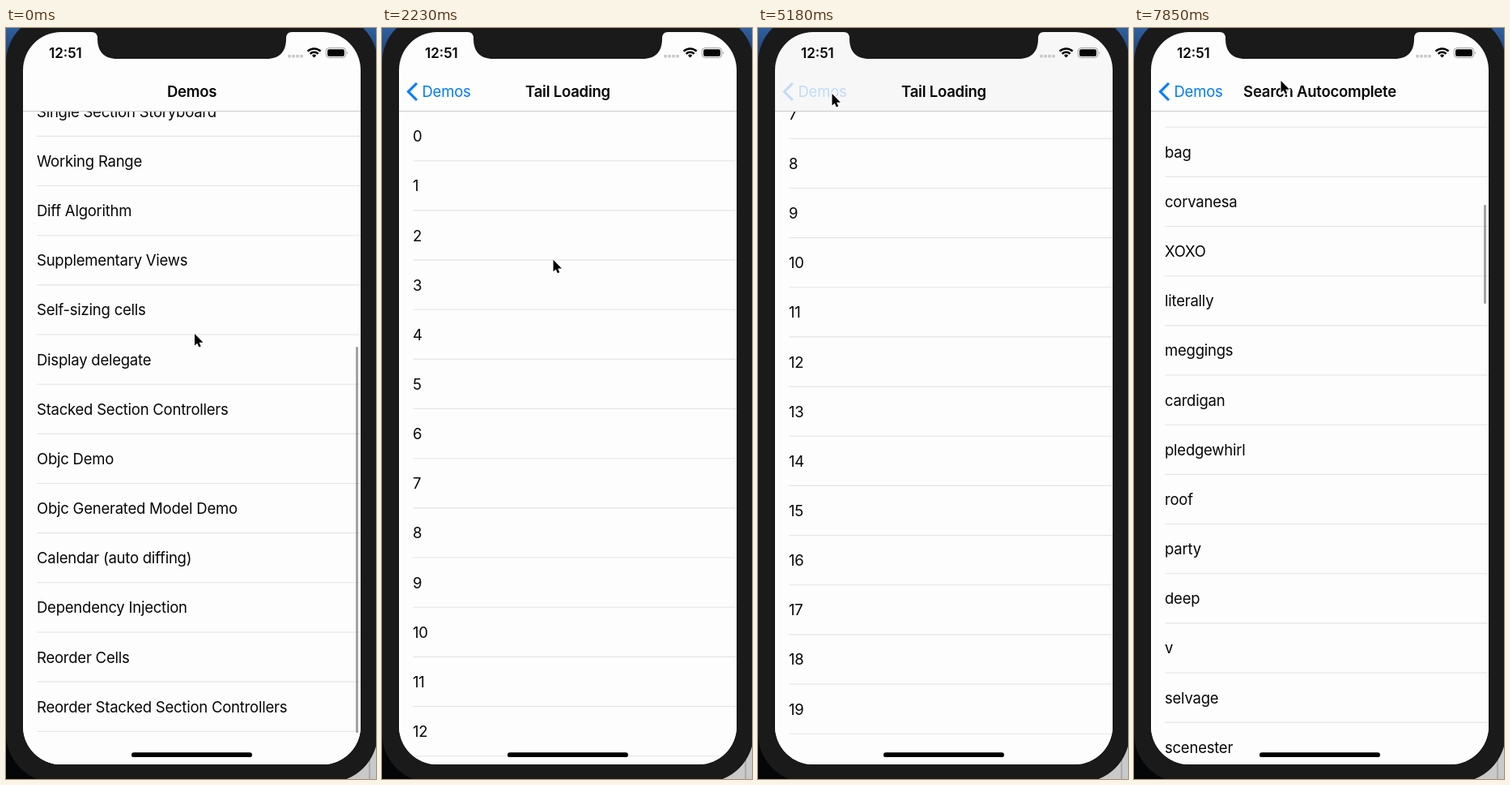
An HTML page that plays this animation: 457 px wide and 926 px high, repeating every 7.99 s.

```html
<!DOCTYPE html>
<html lang="en">
<head>
<meta charset="utf-8">
<title>List demos</title>
<style>
  html, body { margin: 0; width: 100%; height: 100%; overflow: hidden; background: #1a1a1b; }
  svg { display: block; }
  text { font: 18.5px Inter, "Liberation Sans", sans-serif; letter-spacing: -.23px; fill: #060606; }
  .title { font-weight: 600; text-anchor: middle; }
  .clock { font-size: 17px; font-weight: 600; letter-spacing: 0; }
  #back text { fill: #007aff; }
</style>
</head>
<body>
<svg width="457" height="926" viewBox="0 0 457 926">
  <defs>
    <clipPath id="screen"><rect x="21" y="5" width="417" height="903" rx="47"/></clipPath>
    <clipPath id="list"><rect x="21" y="103" width="417" height="805"/></clipPath>
    <linearGradient id="sky" x2="0" y2="1"><stop stop-color="#2f5f9e"/><stop offset="1" stop-color="#16305c"/></linearGradient>
  </defs>

  <!-- desktop corners and phone body -->
  <rect width="457" height="60" fill="url(#sky)"/>
  <rect y="850" width="60" height="76" fill="#050607"/>
  <rect x="400" y="850" width="57" height="76" fill="#c9c9c9"/>
  <path d="M449 850v76" stroke="#8d8d8d"/>
  <rect y="-17" width="459" height="947" rx="60" fill="#1a1a1b"/>

  <g clip-path="url(#screen)">
    <rect x="21" y="5" width="417" height="903" fill="#fdfdfd"/>
    <g id="pages" clip-path="url(#list)"></g>
    <rect id="shade" x="21" y="5" width="417" height="98"/>
    <path d="M21 102.7H438" stroke="#d0d0d2" stroke-width="1.2"/>
    <g id="titles"></g>
    <g id="back">
      <path d="M43 68L32.5 78.5 43 89" fill="none" stroke="#007aff" stroke-width="3.1"/>
      <text x="49.5" y="85">Demos</text>
    </g>
    <text class="clock" x="53" y="36.6">12:51</text>
    <g fill="#c6c6c8">
      <circle cx="350" cy="34.8" r="2"/><circle cx="355" cy="34.8" r="2"/>
      <circle cx="360" cy="34.8" r="2"/><circle cx="365" cy="34.8" r="2"/>
    </g>
    <g fill="none" stroke="#060606" stroke-width="2.5">
      <path d="M372.6 28.7a11.3 11.3 0 0 1 16 0M375.6 31.9a7 7 0 0 1 10 0"/>
      <path d="M380.6 36.6l-2.6-2.7a3.7 3.7 0 0 1 5.2 0z" fill="#060606" stroke="none"/>
    </g>
    <rect x="395.3" y="24.6" width="24.4" height="12" rx="3.6" fill="none" stroke="#a2a2a4"/>
    <rect x="397" y="26.3" width="21" height="8.6" rx="2.2" fill="#060606"/>
    <path d="M421 28.6q1.8 2 0 4z" fill="#a2a2a4"/>
    <path d="M106 4v1q7 0 7 8c0 16 8 25 24 25h185c16 0 24-9 24-25q0-8 7-8v-1z" fill="#1a1a1b"/>
    <rect id="bar" x="432.2" width="2.6" rx="1.3"/>
    <rect x="155" y="893.3" width="149" height="5.8" rx="2.9" fill="#000"/>
  </g>

  <path id="cursor" d="M0-1V13.6L3.2 10.7 5.3 15.6 7.7 14.6 5.6 9.8H10.4Z"
        stroke="#fff" stroke-width="2" paint-order="stroke"/>
</svg>

<script>
const LOOP = 7990, TICK = 148, LAST = 53; // the screen refreshes once per tick
const PITCH = 61.16, TOP = 102.6, WIDTH = 417;
const $ = id => document.getElementById(id);

function add(parent, tag, attrs, text = '') {
  const el = document.createElementNS('http://www.w3.org/2000/svg', tag);
  set(el, attrs);
  el.textContent = text;
  return parent.appendChild(el);
}

function set(el, attrs) {
  for (const k in attrs) el.setAttribute(k, attrs[k]);
}

// progress from 0 to 1 between ticks a and b
function ramp(t, a, b) {
  return Math.max(0, Math.min(1, (t - a) / (b - a)));
}
function ease(t, a, b) {
  const p = ramp(t, a, b);
  return p * p * (3 - 2 * p);
}

// scroll: offset at a tick; rate and size: scroll bar travel per pixel and length
function makePage(name, rows, lead, rate, size, scroll) {
  const slide = add($('pages'), 'g');
  add(slide, 'rect', { x: 21, y: 103, width: WIDTH, height: 805, fill: '#fdfdfd' });
  const list = add(slide, 'g');
  rows.forEach((label, i) => {
    const y = TOP + lead + i * PITCH;
    add(list, 'text', { x: 38, y: y + 37.6 }, label);
    add(list, 'path', { d: `M38 ${y + PITCH}H438`, stroke: '#e4e4e6', 'stroke-width': 1.1 });
  });
  const title = add($('titles'), 'text', { class: 'title', x: 229.5, y: 85 }, name);
  return { slide, list, title, rate, size, scroll };
}

const demos = ['Tail Loading', 'Search Autocomplete', 'Mixed Data', 'Nested Adapter', 'Empty View',
  'Single Section Controller', 'Storyboard', 'Single Section Storyboard', 'Working Range',
  'Diff Algorithm', 'Supplementary Views', 'Self-sizing cells', 'Display delegate',
  'Stacked Section Controllers', 'Objc Demo', 'Objc Generated Model Demo', 'Calendar (auto diffing)',
  'Dependency Injection', 'Reorder Cells', 'Reorder Stacked Section Controllers'];
const words = ('Humblebrag skateboard tacos viral small batch blue bottle pretzel fingerstache mint squid ' +
  'Listicle tote bag corvanesa XOXO literally meggings cardigan pledgewhirl roof party deep v selvage ' +
  'scenester lemon mustache').split(' ');

const main = makePage('Demos', demos, 0, .626, 476,
  t => 458.5 * (1 - ease(t, 0, 8)));
// pulled down a little, flicked up past the end, then springs back
const tail = makePage('Tail Loading', [...Array(20).keys()], 0, .577, 499,
  t => 474.8 * ease(t, 19, 24) - 5.5 * ease(t, 17, 19) - 13.7 * ease(t, 24, 27));
const search = makePage('Search Autocomplete', words, 48.9, .1265, 122,
  t => 885.5 * ease(t, 47, 53));

add(main.slide, 'rect', { x: 21, y: 870, width: WIDTH, height: 38, fill: '#fdfdfd' });
add(search.list, 'rect', { x: 30, y: 111, width: 399, height: 33, rx: 10, fill: '#efeff0' });
add(search.list, 'path', { d: 'M46 131l4 4M47.5 127a5.5 5.5 0 1 1-11 0a5.5 5.5 0 1 1 11 0',
  fill: 'none', stroke: '#8e8e93', 'stroke-width': 1.5 });

// pointer strokes: from tick, to tick, end point
const HOME = [233, 378];
const strokes = [
  [0, 3, 222, 600], [4, 8, 209, 145], [12, 19, 215.5, 505], [19, 24, 235, 201], [31, 35, 91.5, 82],
  [36, 41, 171.5, 200.5], [47, 48, 190, 560], [48, 53, 181.5, 66]];

function pointer(t) {
  return strokes.reduce(([x, y], [a, b, nx, ny]) => {
    const p = ease(t, a, b);
    return [x + (nx - x) * p, y + (ny - y) * p];
  }, HOME);
}

const PUSH = 11, POP = 35, POP_END = 38, PUSH_SEARCH = 45;

function draw(now) {
  const t = Math.min(LAST, Math.floor((now % LOOP + 12) / TICK));
  const page = t < PUSH ? main : t < POP_END ? tail : t < PUSH_SEARCH ? main : search;
  const popping = page === tail && t > POP;
  const p = popping ? 1 - (1 - ramp(t, POP, POP_END)) ** 2 : 0;

  for (const q of [main, tail, search]) {
    const shown = q === page || popping && q === main;
    const x = !popping ? 0 : q === tail ? p * WIDTH : (p - 1) * WIDTH * .3;
    set(q.slide, { display: shown ? 'inline' : 'none', transform: `translate(${x} 0)` });
    set(q.list, { transform: `translate(0 ${-q.scroll(t)})` });
    set(q.title, { opacity: !shown ? 0 : q === page ? 1 - p : p, transform: `translate(${x * .4} 0)` });
  }

  const pressed = page === tail && t >= POP;
  set($('back'), { opacity: page === main ? 0 : pressed ? .22 * (1 - p) : 1 });
  set($('shade'), { opacity: .022 * (ramp(t, 24, 30) - ramp(t, POP, POP + 1)) });

  const visible = 1 - ramp(t, 8, 10) + ramp(t, 17, 18) - ramp(t, 27, 30) + ramp(t, 47, 48);
  const y = 106 + Math.max(0, page.scroll(t)) * page.rate;
  set($('bar'), { y, height: page.size, opacity: .4 * visible });
  set($('cursor'), { transform: `translate(${pointer(t)})` });
}

const start = performance.now();
function frame() {
  draw(performance.now() - start);
  requestAnimationFrame(frame);
}
frame();
</script>
</body>
</html>
```
